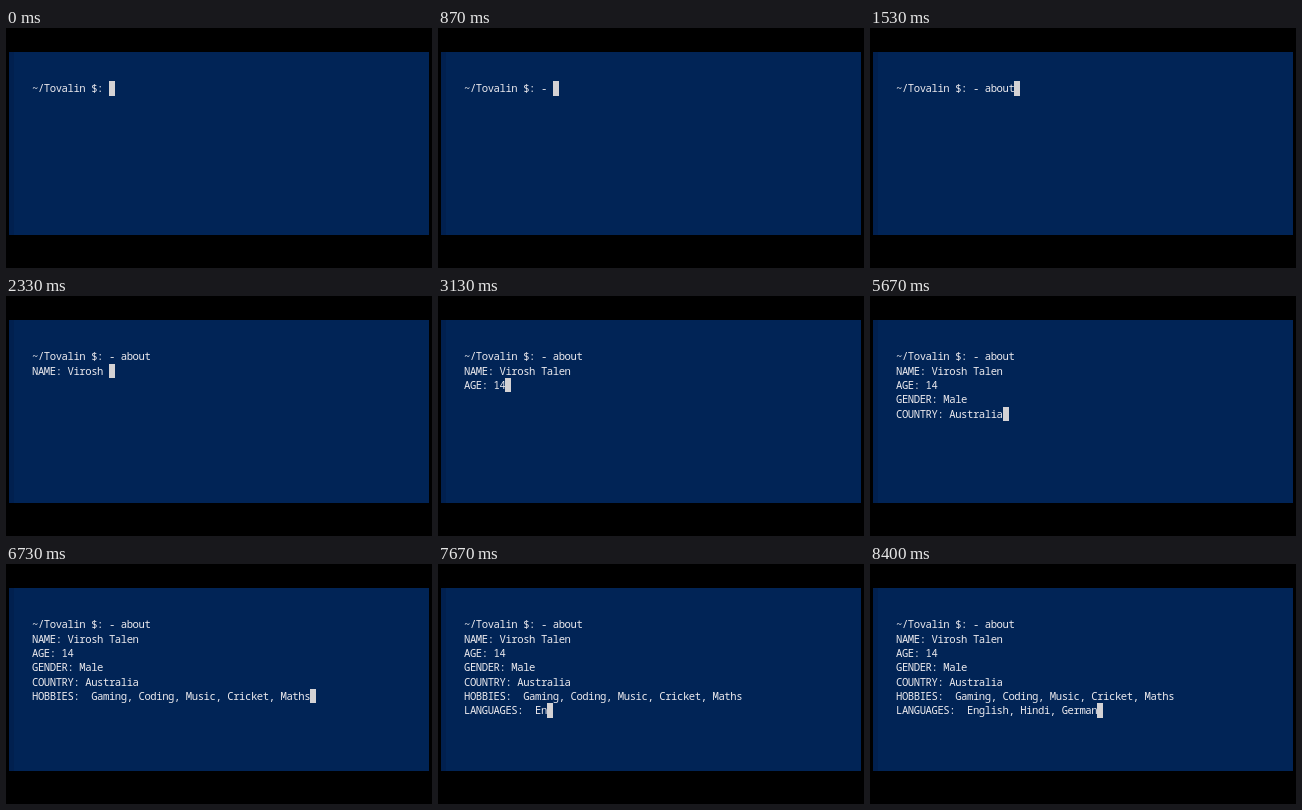
Write an HTML page that moves like this. It is 426 by 240 pixels and loops after 8470 ms.

```html
<!DOCTYPE html>
<html lang="en">
<head>
<meta charset="utf-8">
<title>Terminal</title>
<style>
  html, body { margin: 0; width: 100%; height: 100%; overflow: hidden; background: #000; }
  #panel {
    position: absolute; left: 3px; top: 24px; width: 415px; height: 183px;
    background: #012456; border-left: 5px solid #01204f;
  }
  pre {
    position: absolute; left: 18px; top: 29.3px; margin: 0;
    font: 500 10.6px/14.33px "Noto Sans Mono", monospace; letter-spacing: -0.44px; color: #eceaee;
  }
  #cursor { display: inline-block; width: 6px; height: 14.33px; vertical-align: top; background: #d4d2d4; }
</style>
</head>
<body>
<div id="panel"><pre><span id="text"></span><span id="cursor"></span></pre></div>
<script>
const LOOP = 8470, FPS = 15, STEP = 70;
const PROMPT = "~/Tovalin $: ";

// Typing bursts: first step (ms), last step (ms), typed text
const bursts = [
  [70, 600, "- "],
  [870, 1530, "about"],
  [1870, 2530, "\nNAME: Virosh Talen"],
  [2930, 3130, "\nAGE: 14"],
  [3200, 3270, "\nGEN"],
  [3470, 3530, "DER"],
  [4000, 4200, ": Mal"],
  [4470, 4470, "e"],
  [4530, 4670, "\nCOUN"],
  [5000, 5130, "TRY: A"],
  [5470, 5670, "ustralia"],
  [5730, 6730, "\nHOBBIES:  Gaming, Coding, Music, Cricket, Maths"],
  [6800, 6870, "\nLAN"],
  [7070, 7200, "GUAGE"],
  [7470, 7530, "S:  "],
  [7670, 8400, "English, Hindi, German"],
];

const output = document.getElementById("text");

function typedPart(time, [from, to, text]) {
  const progress = (time - from + STEP) / (to - from + STEP);
  const clamped = Math.min(1, Math.max(0, progress));
  return text.slice(0, Math.round(text.length * clamped));
}

function draw() {
  const now = performance.now() % LOOP;
  const time = Math.floor((now + 4) * FPS / 1000) * 1000 / FPS;
  const content = PROMPT + bursts.map(burst => typedPart(time, burst)).join("");
  if (output.textContent !== content) output.textContent = content;
  requestAnimationFrame(draw);
}
draw();
</script>
</body>
</html>
```
